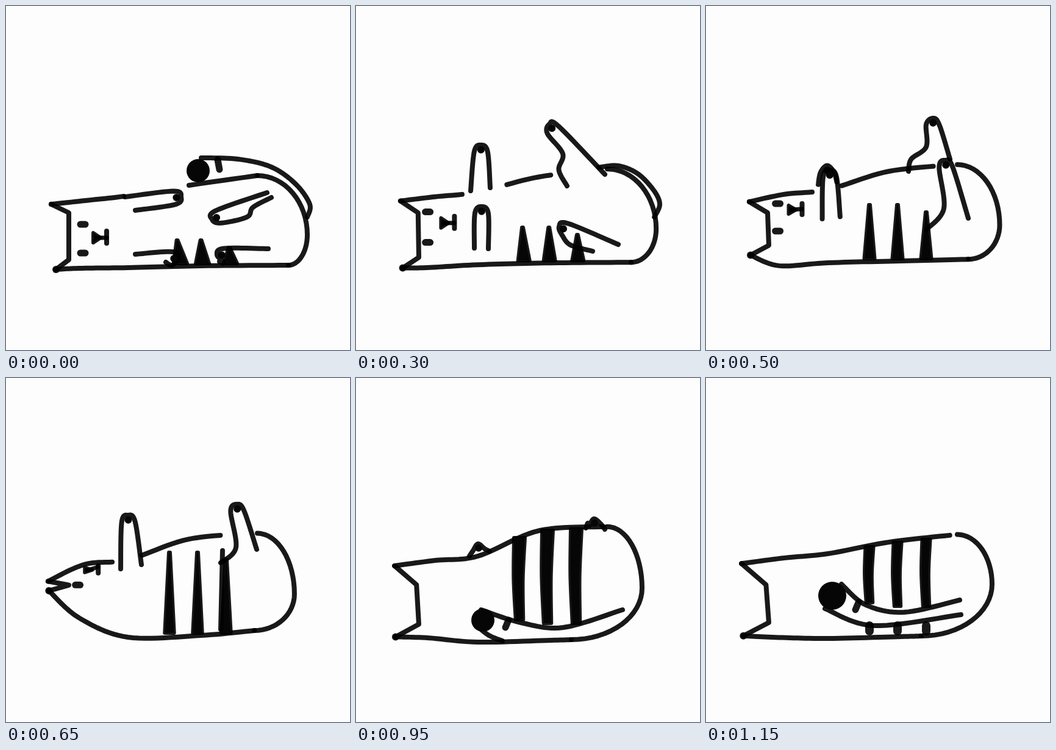
Recreate the animation shown at these times as an HTML page with a canvas. Size 564 by 564 pixels, loop 1200 ms.

```html
<!DOCTYPE html>
<html lang="en">
<head>
<meta charset="utf-8">
<title>Rolling cat</title>
<style>
html, body { margin: 0; width: 100%; height: 100%; overflow: hidden; background: #fdfdfd; }
canvas { display: block; width: 100vw; height: 100vh; }
</style>
</head>
<body>
<canvas id="stage" width="564" height="564"></canvas>
<script>
const ctx = document.getElementById('stage').getContext('2d');
const SIZE = 564, STEP = 50, STEPS = 24;
const INK = 'rgba(0,0,0,.9)', SOLID = '#060606';

const clamp = (v, lo, hi) => Math.max(lo, Math.min(hi, v));
const mix = (a, b, f) => a + (b - a) * f;
const smooth = f => (f = clamp(f, 0, 1)) * f * (3 - 2 * f);

// Blends the rows around step k; null outside the first and last row.
function key(k, rows) {
  const at = Object.keys(rows).map(Number);
  const i = at.findIndex(s => s >= k);
  if (i < 0 || k < at[0]) return null;
  if (i === 0) return rows[at[0]];
  const f = (k - at[i - 1]) / (at[i] - at[i - 1]);
  return rows[at[i]].map((v, n) => mix(rows[at[i - 1]][n], v, f));
}

const pairs = p => p.flatMap((v, i) => i % 2 ? [] : [[v, p[i + 1]]]);

// Smooth curve through the points, as a list of samples.
function curve(pts, n = 12) {
  const out = [pts[0]];
  for (let i = 0; i < pts.length - 1; i++) {
    const b = pts[i], c = pts[i + 1], a = pts[i - 1] || b, d = pts[i + 2] || c;
    for (let j = 1; j <= n; j++) {
      const t = j / n;
      out.push([0, 1].map(m => b[m] + t / 2 * (c[m] - a[m]
        + t * (2 * a[m] - 5 * b[m] + 4 * c[m] - d[m])
        + t * t * (3 * b[m] - a[m] - 3 * c[m] + d[m]))));
    }
  }
  return out;
}

// Quarter ellipse from the top or bottom point (x, y) to the side.
function quarter(x, y, sideX, sideY) {
  return Array.from({ length: 17 }, (_, i) => {
    const a = i / 16 * Math.PI / 2;
    return [mix(x, sideX, Math.sin(a)), mix(sideY, y, Math.cos(a))];
  });
}

function trace(pts) {
  ctx.beginPath();
  pts.forEach(p => ctx.lineTo(...p));
}

function line(pts, width = 8) {
  if (pts.length < 2) return;
  trace(pts);
  ctx.lineWidth = width;
  ctx.stroke();
}

function solid(pts) {
  trace(pts);
  ctx.closePath();
  ctx.lineWidth = 6;
  ctx.stroke();
  ctx.fill();
}

function dot(x, y, r) {
  ctx.beginPath();
  ctx.arc(x, y, r, 0, Math.PI * 2);
  ctx.fill();
}

// Outline of the cat at step k; the head pinches to a profile at step 13.
function shape(k) {
  const pinch = clamp(1 - Math.abs(k - 13) / 4, 0, 1);
  const late = Math.max(0, k - 19);
  const floor = key(k, { 0: [428], 10: [420], 19: [432], 23: [426] })[0];
  const ear = [74 - .03 * k * k, 325 - .9 * k + 20 * pinch];
  const chin = [82 - .9 * k, 432 - .4 * k - 78 * pinch];
  const hipY = 278 - 1.8 * k + 5 * late;
  const end = [463 - Math.min(110, .33 * k * k), floor - 3 - 7 * pinch];
  const side = [mix(494, 469, smooth((k - 4) / 12)), 375 - 1.6 * k];
  return {
    pinch, floor, chin,
    head: [ear, [103 - .2 * k, 339], [103, 416 - .65 * k - 68 * pinch], chin],
    top: curve([ear, [130, 319 - 1.05 * k], [200, 311 - k],
      [300, 294 - 2.3 * k + 7 * late], [412, hipY]]),
    rump: [...quarter(412, hipY, ...side), ...quarter(...end, ...side).reverse()],
    belly: curve([chin, [120, 430 - .2 * k - 34 * pinch * pinch], [200, floor + 1], [320, floor - 2], end])
  };
}

function drawBody(k, s) {
  const neckEnd = 195 - 3 * Math.min(k, 6);
  const backStart = k > 15 ? 0 : Math.max(217, 293 - 9 * k);
  const backEnd = key(k, { 0: [412], 6: [325], 10: [378], 13: [362], 17: [412], 23: [404] })[0];
  line(s.head);
  line(s.top.filter(p => p[0] <= neckEnd || (k > 15 && p[0] <= backEnd)));
  if (k <= 15) line(s.top.filter(p => p[0] >= backStart && p[0] <= backEnd));
  line(s.rump);
  line(s.belly);
  dot(...s.chin, 6);
}

// Stripes climb from the floor, reach the back, then end at the tail.
function drawStripes(k, s) {
  const cut = k > 17 ? key(k, { 17: [420], 19: [402], 23: [374] })[0] : s.floor - 6;
  [268, 314, 361].forEach((x, i) => {
    const lean = [18, 8, 7][i] * Math.max(0, 1 - k / 10);
    const edge = s.top.find(p => p[0] >= x)[1] + 3;
    const tip = Math.max(edge, 384 + (i === 2 ? 12 : 0) - .58 * k * k);
    const w = k < 14 ? 1 : mix(1, 9, clamp((k - 13) / 3, 0, 1)) - .6 * Math.max(0, k - 19);
    const b = 11 - .25 * k;
    const foot = cut - (k > 17 ? [6, 0, 0][i] : 0);
    const mid = (tip + foot) / 2;
    const bow = k > 15 ? -2 : 0;
    ctx.fillStyle = SOLID;
    solid([...curve([[x + lean * .7 + w, tip], [x + lean * .85 + (w + b) / 2 + bow, mid], [x + lean + b, foot]]),
      ...curve([[x + lean - b, foot], [x + lean * .85 - (w + b) / 2 + bow, mid], [x + lean * .7 - w, tip]])]);
    if (k > 20) line([[x, 406], [x, 415]], 14);
  });
  if (k > 10 && k < 16) line([[355, 283], [352, s.floor - 12]]);
}

const frontLegs = [{
  0: [195,313, 287,313, 212,335], 6: [188,303, 205,228, 220,298], 11: [183,290, 197,270, 213,286]
}, {
  0: [212,407, 283,414, 262,420], 6: [194,397, 206,329, 217,398], 13: [188,313, 200,225, 222,306],
  17: [185,298, 200,235, 218,280], 19: [186,292, 200,272, 219,284]
}];

// Hind legs add a heel between the tip and the second end.
const hindLegs = [{
  0: [428,306, 338,350, 395,346, 435,314], 6: [408,276, 317,194, 339,242, 346,295],
  8: [404,262, 352,150, 343,235, 340,283], 10: [400,251, 373,184, 361,231, 332,271],
  12: [406,262, 388,238, 368,255, 360,266]
}, {
  0: [430,398, 346,408, 350,419, 356,422], 6: [430,391, 333,362, 352,392, 388,402],
  10: [430,348, 393,253, 390,332, 362,366], 13: [411,281, 379,207, 377,278, 352,303],
  15: [410,262, 380,160, 372,240, 370,255], 17: [408,252, 380,183, 370,235, 371,250],
  19: [408,248, 390,231, 380,238, 377,246]
}];

// A leg runs up one side, round its tip and down the other.
function drawLeg(row, calf = 0) {
  if (!row) return;
  const [from, tip, ...rest] = pairs(row);
  const to = rest[rest.length - 1];
  const dx = tip[0] - (from[0] + to[0]) / 2, dy = tip[1] - (from[1] + to[1]) / 2;
  const len = Math.hypot(dx, dy), r = Math.min(11, len * .6);
  const ux = dx / len * r, uy = dy / len * r;
  const turn = Math.sign((from[0] - to[0]) * uy - (from[1] - to[1]) * ux) || 1;
  const edge = d => [tip[0] - ux + d * uy, tip[1] - uy - d * ux];
  if (calf) rest.splice(1, 0, [(rest[0][0] + to[0]) / 2 - calf, (rest[0][1] + to[1]) / 2]);
  line(curve([from, edge(turn), tip, edge(-turn), ...rest]));
  dot(tip[0] - ux * .7, tip[1] - uy * .7, 6);
}

function drawTail(k) {
  ctx.fillStyle = SOLID;
  if (k < 9) {
    const x = 320 + 13 * k, y = 249 + 2.6 * k, f = k / 6;
    line(curve([[x, y], [mix(380, 430, f), mix(251, 262, f)], [mix(435, 462, f), mix(264, 275, f)],
      [mix(475, 488, f), mix(292, 302, f)], [498, 325], [494 - .8 * k, 346]]));
    if (k < 4) {
      dot(x - 5, y + 21 - 3 * k, 19 - 4 * k);
      line([[x + 27, y + 3], [x + 30, y + 19 - 4 * k]], 11);
    }
  }
  if (k < 17) return;
  const upper = pairs(key(k, {
    17: [222,405, 275,413, 315,424, 340,427],
    19: [205,380, 270,401, 340,409, 437,380],
    23: [222,338, 262,372, 325,384, 416,364]
  }));
  const lower = pairs(key(k, {
    17: [215,420, 225,428, 240,430], 19: [200,408, 218,422, 240,431], 23: [195,378, 275,406, 418,388]
  }));
  line(curve(upper));
  line(curve(lower));
  dot(...key(k, { 17: [226,415,15], 19: [208,397,19], 23: [207,357,23] }));
  const y = upper[1][1];
  if (k > 17) line([[250, y - 4], [245, y + 8]], 11);
}

function drawFace(k, pinch) {
  const x = 122 - 1.4 * Math.min(k, 6);
  const eye = y => line([[x, y], [x + 8, y]], 11);
  if (k < 12) eye(358 - 3.4 * k);
  if (k < 16) eye(405 - 2.9 * k - 28 * pinch);
  if (k > 13) return;
  const nx = 149 - .6 * k - 6 * pinch, ny = 380 - 3.2 * k - .14 * k * k;
  const h = 8 - 4 * pinch;
  ctx.fillStyle = SOLID;
  solid([[nx - 6, ny - h], [nx - 6, ny + h], [nx + 6, ny]]);
  line([[nx, ny], [nx + 16, ny - 5 * pinch]], 7);
  line([[nx + 16, ny - h - 3], [nx + 16, ny + h + 1]]);
}

function draw(k) {
  ctx.fillStyle = '#fdfdfd';
  ctx.fillRect(0, 0, SIZE, SIZE);
  ctx.strokeStyle = ctx.fillStyle = INK;
  ctx.lineCap = ctx.lineJoin = 'round';
  const s = shape(k);
  drawBody(k, s);
  drawStripes(k, s);
  frontLegs.forEach(leg => drawLeg(key(k, leg)));
  hindLegs.forEach((leg, i) => drawLeg(key(k, leg), i ? 0 : 10));
  drawTail(k);
  drawFace(k, s.pinch);
}

const start = performance.now();
let shown = -1;
function tick(now) {
  const k = Math.floor(Math.max(0, now - start) / STEP) % STEPS;
  if (k !== shown) draw(shown = k);
  requestAnimationFrame(tick);
}
tick(start);
</script>
</body>
</html>
```
